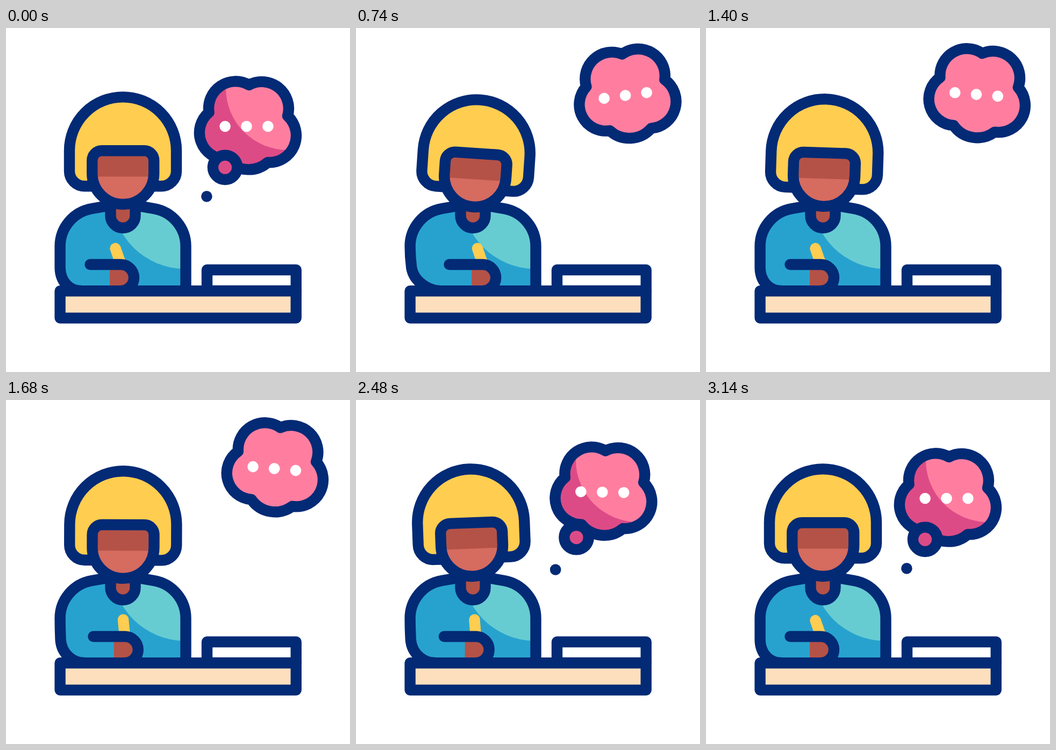
These frames come from a looping animation (640x640 px, 3.6 s). An HTML page:

```html
<!DOCTYPE html>
<html lang="en">
<head>
<meta charset="utf-8">
<title>Thinking while writing</title>
<style>
  html, body { margin: 0; width: 100%; height: 100%; overflow: hidden; background: #fff; }
  svg { display: block; width: 100vw; height: 100vh; }
  .line { stroke: #032a75; stroke-width: 20.4; stroke-linecap: round; stroke-linejoin: round; }
  .open { fill: none; }
  .navy { fill: #032a75; }
  .blue { fill: #27a2ce; }
  .teal { fill: #67ccd2; }
  .gold { fill: #ffcd50; }
  .brown { fill: #b45247; }
  .skin { fill: #d66b5f; }
  .pink { fill: #ff7ea0; }
  .berry { fill: #dd4b86; }
  .white { fill: #fff; }
  .tan { fill: #fddfbd; }
  .pencil { stroke: #ffcd50; stroke-width: 20.4; stroke-linecap: round; }
</style>
</head>
<body>
<svg viewBox="0 0 640 640">
  <defs>
    <path id="puff" d="M452 106A50 50 0 0 1 524 163.5A50 50 0 0 1 487 250A54 54 0 0 1 410 244A49.2 49.2 0 0 1 377.6 157A50 50 0 0 1 452 106Z"/>
    <path id="faceShape" d="M178.3 228.3H257.2A18 18 0 0 1 275.2 246.3V270.5A57.4 57.4 0 0 1 160.3 270.5V246.3A18 18 0 0 1 178.3 228.3Z"/>
    <clipPath id="puffClip"><use id="puffMask" href="#puff"/></clipPath>
    <clipPath id="faceClip"><use href="#faceShape"/></clipPath>
    <clipPath id="bodyClip"><path id="bodyMask"/></clipPath>
  </defs>

  <g clip-path="url(#bodyClip)">
    <rect class="blue" x="90" y="320" width="260" height="170"/>
    <circle class="teal" cx="333" cy="312" r="136"/>
  </g>
  <path id="bodyLine" class="line open"/>
  <path class="line brown" d="M194.5 330V349A23 23 0 0 0 240.5 349V330"/>

  <g id="hand">
    <line id="pencil" class="pencil" x1="213" y1="437" x2="213" y2="408.5"/>
    <path class="brown" d="M193 440H213.5A24.5 24.5 0 0 1 213.5 489H193Z"/>
  </g>
  <path id="sleeve" class="line open"/>

  <g id="head">
    <path class="line gold" d="M165 294.2H146A28 28 0 0 1 118 266.2V227.8A99.5 99.5 0 0 1 317 227.8V266.2A28 28 0 0 1 289 294.2H270"/>
    <g clip-path="url(#faceClip)">
      <rect class="skin" x="150" y="220" width="135" height="120"/>
      <rect class="brown" x="150" y="220" width="135" height="56.5"/>
    </g>
    <use href="#faceShape" class="line open"/>
  </g>

  <rect class="line white" x="374" y="450" width="165.7" height="39"/>
  <rect class="line tan" x="100.6" y="489.2" width="439.1" height="50.4"/>

  <!-- The light stays still while the cloud slides through it -->
  <g clip-path="url(#puffClip)">
    <rect class="berry" x="320" y="0" width="320" height="320"/>
    <circle class="pink" cx="524" cy="112" r="115"/>
  </g>
  <g id="cloud">
    <use href="#puff" class="line open"/>
    <circle class="white" cx="407.6" cy="183" r="10.3"/>
    <circle class="white" cx="447.5" cy="183" r="10.3"/>
    <circle class="white" cx="487.4" cy="183" r="10.3"/>
  </g>
  <circle id="bubble" class="line berry" r="22.7"/>
  <circle id="speck" class="navy" r="10.3"/>
</svg>

<script>
const LOOP = 3600, ACTIVE = 3140, WRITING = 2800, STROKE = 1400;
const $ = id => document.getElementById(id);
const move = (id, value) => $(id).setAttribute('transform', value);

const part = (t, from, to) => Math.min(1, Math.max(0, (t - from) / (to - from)));
const ease = s => s * s * (3 - 2 * s);
const ramp = (t, from, to) => ease(part(t, from, to));
const wave = (t, period) => (1 - Math.cos(2 * Math.PI * t / period)) / 2;

// Starts from zero and eases on to each [time, value] turning point
const swing = (t, ...turns) => {
  let time = 0, value = 0, result = 0;
  for (const [nextTime, next] of turns) {
    result += (next - value) * ramp(t, time, nextTime);
    [time, value] = [nextTime, next];
  }
  return result;
};

function drawArm(t) {
  const time = Math.min(t, WRITING);
  const x = 22.3 * wave(time, STROKE), elbow = .77 * x;
  const body = `M${140 + elbow} 489C${118 + elbow} 489 ${101 + .3 * x} 472 ${100.6 + .12 * x} 446` +
    'Q100.6 425 100.6 406C100.6 372 125 342 160 336L195 330H240L275 336C310 342 334.5 372 334.5 406V489';
  $('bodyMask').setAttribute('d', body + 'Z');
  $('bodyLine').setAttribute('d', body);
  $('sleeve').setAttribute('d', `M${156.5 + elbow} 440H${213.5 + x}a24.5 24.5 0 0 1 0 49`);
  move('hand', `translate(${x} 0)`);
  move('pencil', `rotate(${-19.3 + 15.3 * wave(time, STROKE / 2)} 213 437)`);
}

function drawHead(t) {
  const tilt = swing(t, [440, 3.8], [1060, 3.8], [1700, .2], [2100, 2.9], [2530, -2.3], [2900, 0]);
  const nod = swing(t, [400, 5.4], [1200, 3.9], [1640, 3.9], [2540, 0]);
  move('head', `translate(0 ${nod}) rotate(${tilt} 217.5 330)`);
}

function drawCloud(t) {
  const lift = ramp(t, 40, 840) * (1 - part(t, 1120, 2770) ** 3) ** 2;
  const sway = swing(t, [440, -10.5], [1580, 5.8], [2260, -7], [2640, 6], [ACTIVE, 0]);
  const pose = `translate(${56 * lift} ${-60 * lift}) rotate(${sway} 447.5 183)`;
  move('cloud', pose);
  move('puffMask', pose);
}

function drawTrail(t) {
  const drift = 5 * (ramp(t, 200, 900) - ramp(t, 2000, 2900));
  const size = (hide, show) => 1 - ramp(t, hide, hide + 160) + ramp(t, show, show + 120);
  move('bubble', `translate(${407.6 + 1.1 * drift} ${259.3 - 1.6 * drift}) scale(${size(480, 2260)})`);
  move('speck', `translate(${373.4 - drift} ${313.4 + drift}) scale(${size(560, 2020)})`);
}

const start = performance.now();

function frame() {
  const t = Math.min((performance.now() - start) % LOOP, ACTIVE);
  drawArm(t);
  drawHead(t);
  drawCloud(t);
  drawTrail(t);
  requestAnimationFrame(frame);
}

frame();
</script>
</body>
</html>
```
